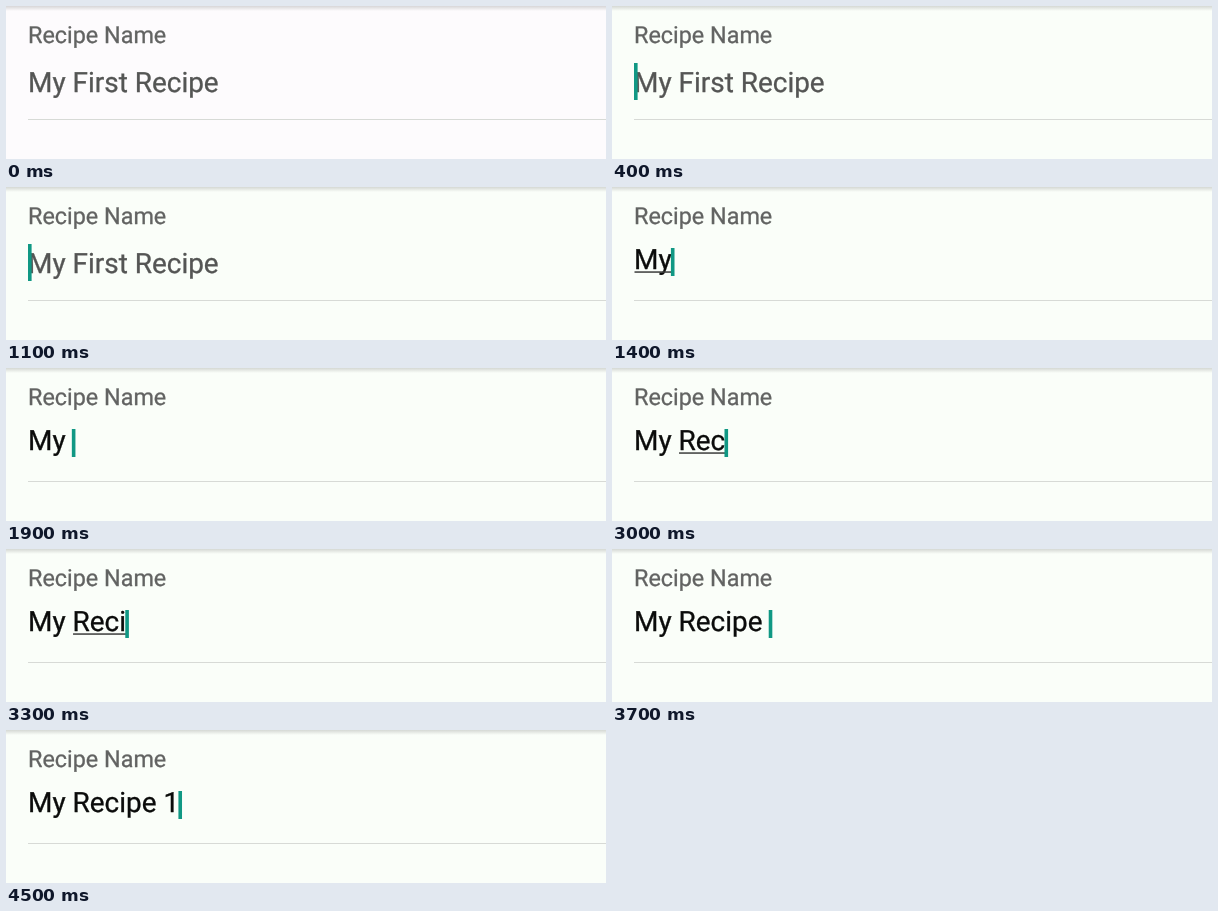
Animation of 600x153 px, one loop 4.6 s. Source, as an HTML page:

```html
<!DOCTYPE html>
<html lang="en">
<head>
<meta charset="utf-8">
<title>Recipe name field</title>
<style>
  html, body { margin: 0; width: 100%; height: 100%; overflow: hidden; }
  body { background: #fafef9; animation: tint 4600ms step-end infinite; }
  svg { display: block; width: 600px; height: 153px; }
  text {
    font-family: Roboto, Arial, sans-serif;
    white-space: pre;
    text-rendering: geometricPrecision;
    stroke-width: .3px;
  }
  .label { font-size: 23.35px; fill: #626362; stroke: #626362; }
  .hint, .typed { font-size: 27.95px; }
  .hint { fill: #545554; stroke: #545554; }
  .typed { fill: #0b0c0b; stroke: #0b0c0b; }
  .caret { fill: #109884; }
  @keyframes tint { 0% { background: #fdfbfd; } 2.174% { background: #fafef9; } }
</style>
</head>
<body>
<svg viewBox="0 0 600 153">
  <defs>
    <linearGradient id="shade" x1="0" y1="0" x2="0" y2="1">
      <stop offset="0" stop-color="#000" stop-opacity=".15"/>
      <stop offset="1" stop-color="#000" stop-opacity="0"/>
    </linearGradient>
  </defs>
  <rect width="600" height="5" fill="url(#shade)"/>
  <text class="label" x="22.1" y="37.3">Recipe Name</text>
  <rect x="22" y="113" width="578" height="1" fill="#d7dad6"/>
  <text class="hint" id="hint" x="22" y="85.7">My First Recipe</text>
  <text class="typed" id="typed" x="22" y="82.2"></text>
  <rect id="line" y="84.3" height="1.5" fill="#3c3e3c"/>
  <rect class="caret" id="caret"/>
</svg>
<script>
  const LOOP = 4600, LEFT = 22;
  // [start ms, text, caret visible, last word underlined]
  const steps = [
    [0, "", 0, 0],
    [100, "", 1, 0],
    [600, "", 0, 0],
    [1100, "", 1, 0],
    [1200, "M", 1, 1],
    [1400, "My", 1, 1],
    [1500, "My ", 1, 0],
    [2200, "My R", 1, 1],
    [2500, "My Re", 1, 1],
    [2800, "My Rec", 1, 1],
    [3200, "My Reci", 1, 1],
    [3400, "My Recip", 1, 1],
    [3500, "My Recipe", 1, 1],
    [3700, "My Recipe ", 1, 0],
    [4300, "My Recipe 1", 1, 0]
  ];
  const [hint, typed, line, caret] =
    ["hint", "typed", "line", "caret"].map(id => document.getElementById(id));
  const pen = document.createElement("canvas").getContext("2d");
  pen.font = "27.95px Roboto, Arial, sans-serif";
  const widthOf = s => pen.measureText(s).width;

  function set(el, attrs) {
    for (const key in attrs) el.setAttribute(key, attrs[key]);
  }
  function show(el, on) {
    el.style.visibility = on ? "visible" : "hidden";
  }

  function draw([, text, caretOn, underlined]) {
    const end = LEFT + widthOf(text);
    const wordStart = LEFT + widthOf(text.slice(0, text.lastIndexOf(" ") + 1));
    typed.textContent = text;
    show(hint, !text);
    show(caret, caretOn);
    show(line, underlined);
    set(line, { x: wordStart + 0.5, width: Math.max(0, end - wordStart) });
    set(caret, text
      ? { x: end - 0.7, y: 61, width: 3.6, height: 28 }
      : { x: 22, y: 57, width: 3.6, height: 37 });
  }

  let current;
  function frame() {
    const t = performance.now() % LOOP;
    const step = steps.findLast(s => s[0] <= t);
    if (step !== current) draw(current = step);
    requestAnimationFrame(frame);
  }
  frame();
</script>
</body>
</html>
```
